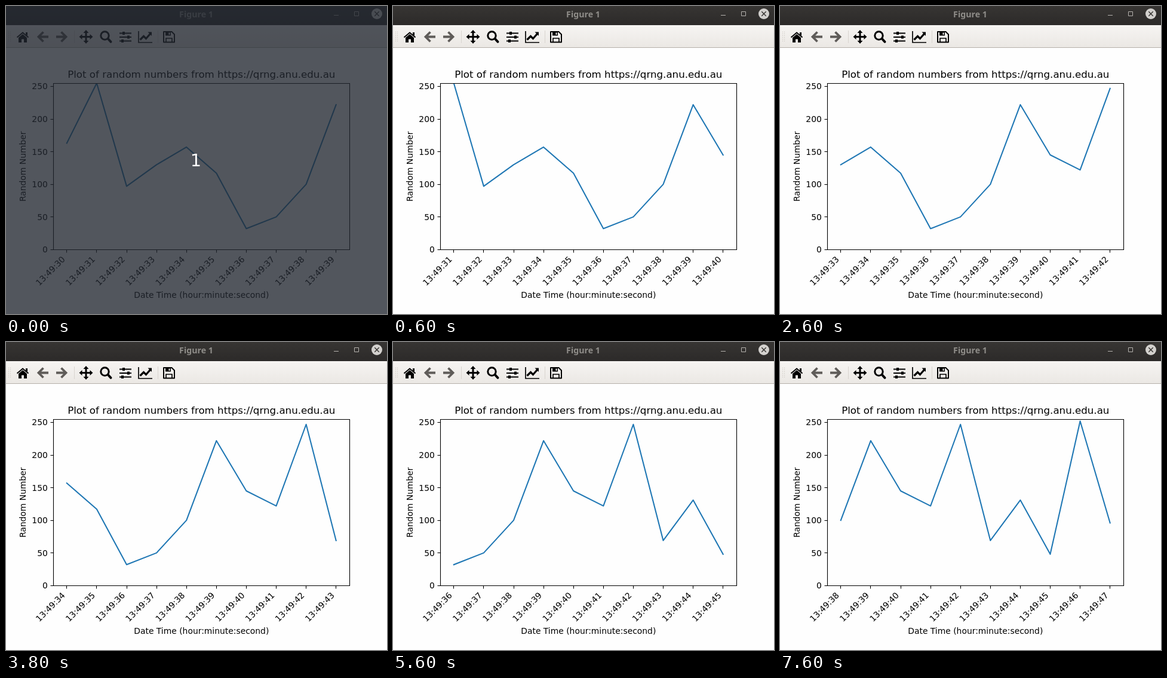
These frames come from a looping animation (638 px wide and 515 px high, 8000 ms). An HTML page:

```html
<!DOCTYPE html>
<html lang="en">
<head>
<meta charset="utf-8">
<title>Figure 1</title>
<style>
  html, body { margin: 0; width: 100%; height: 100%; overflow: hidden; background: #fefefe; }
  svg { display: block; }
  text { font-family: "DejaVu Sans", sans-serif; font-size: 13.89px; }
  .title { font-size: 16.67px; }
  .caption { font: bold 14.2px "Noto Sans", sans-serif; fill: #8f8d89; }
  .count { font-size: 28.8px; fill: #fff; }
  .mid { text-anchor: middle; }
  .end { text-anchor: end; }
  .line { fill: none; stroke: #1f77b4; stroke-width: 2.08; stroke-linejoin: round; stroke-linecap: square; }
  .axes { fill: none; stroke: #000; stroke-width: 1.1; }
  .icon { fill: none; stroke: #000; stroke-width: 2; }
  .arrow { fill: none; stroke: #5f5c59; stroke-width: 3.8; }
</style>
</head>
<body>
<svg width="638" height="515" viewBox="0 0 638 515">
  <defs>
    <linearGradient id="bar" x2="0" y2="1">
      <stop stop-color="#373533"/><stop offset="1" stop-color="#2c2a29"/>
    </linearGradient>
    <linearGradient id="tools" x2="0" y2="1">
      <stop stop-color="#f6f4f2"/><stop offset="1" stop-color="#ebe8e4"/>
    </linearGradient>
    <clipPath id="plot"><path d="M79.5 129H575.5V407.5H79.5z"/></clipPath>
  </defs>
  <rect width="638" height="515" fill="#fefefe"/>

  <!-- Window bar -->
  <rect width="638" height="32" fill="url(#bar)"/>
  <text class="caption mid" x="318.5" y="19">Figure 1</text>
  <path d="M549 15.5h8M583.5 9.5h7v7h-7z" fill="none" stroke="#b5b2ae"/>
  <circle cx="621" cy="13" r="9" fill="#d3d1ce"/>
  <path d="M617.3 9.3l7.4 7.4m0-7.4l-7.4 7.4" stroke="#33312f" stroke-width="1.4"/>

  <!-- Toolbar -->
  <rect y="32" width="638" height="37" fill="url(#tools)"/>
  <path d="M0 69.5H638" stroke="#b5b0aa"/>
  <path d="M4.5 43v17M7.5 43v17" stroke="#c4bfb9" stroke-dasharray="1 2"/>
  <path d="M114.5 41v21M254.5 41v21" stroke="#d8d4cf"/>
  <path d="M18.5 52.5L28 44.5l9.5 8" class="icon"/>
  <path d="M33 44h3v6l-3-2.500zM21 53l7-6 7 6v8h-5v-5.500h-4V61h-5z"/>
  <path class="arrow" d="M62.500 43.500l-8 8 8 8M54 51.500h17"/>
  <path class="arrow" d="M92.500 43.500l8 8-8 8M101 51.500H84"/>
  <path class="icon" style="stroke-width:3" d="M134 43v17M126 51.500h16"/>
  <path d="M134 40l4.500 5h-9zM134 63l4.500-5h-9zM122.500 51.500l5-4.500v9zM145.500 51.500l-5-4.500v9z"/>
  <circle class="icon" cx="165.500" cy="49.500" r="6.700" style="stroke-width:3"/>
  <path class="icon" style="stroke-width:4;stroke-linecap:round" d="M171.500 55.500l4 4.300"/>
  <path class="icon" d="M190 45.500h20M190 52h20M190 58.500h20"/>
  <path d="M195 43h4v5h-4zM203 49.500h4v5h-4zM193 56h4v5h-4z"/>
  <path class="icon" d="M222 42v19h23" style="stroke-width:1.700"/>
  <path class="icon" d="M224.500 56.500l6-6 4 4 7-8" style="stroke-width:3.200"/>
  <path d="M237.500 43.500h6.500v6.500z"/>
  <path class="icon" d="M264 43h13.500l4.500 4.500V60.500H264z" stroke-linejoin="round"/>
  <path class="icon" d="M268 60v-6h10v6" style="stroke-width:1.700"/>
  <path d="M267 43h9v6.500h-9z"/>
  <path d="M272.500 44.500h2v3.500h-2z" fill="#f1efec"/>

  <!-- Chart -->
  <text class="title mid" x="327.300" y="120">Plot of random numbers from https://qrng.anu.edu.au</text>
  <text class="mid" x="327.300" y="488">Date Time (hour:minute:second)</text>
  <text class="mid" transform="translate(33.300 268.300) rotate(-90)">Random Number</text>
  <polyline id="line" class="line" clip-path="url(#plot)"/>
  <path class="axes" d="M79.500 129.500H575.500V407.500H79.500z"/>
  <g id="ticks"></g>

  <g id="shade">
    <rect width="638" height="515" fill="#222730" fill-opacity=".78"/>
    <text class="count mid" x="318" y="268">1</text>
  </g>
</svg>
<script>
  const LOOP = 8000, SHOWN = 10;
  const values = [163, 255, 97, 130, 157, 117, 32, 50, 100, 222, 145, 122, 247, 69, 131, 48, 252, 96];
  const updates = [600, 1600, 2600, 3800, 4600, 5600, 6600, 7600];
  const xAt = i => 101.8 + 50.1 * i;
  const yAt = v => 407.2 - 1.0909 * v;
  const snap = n => Math.floor(n) + .5;
  const $ = id => document.getElementById(id);

  let ticks = "";
  for (let v = 0; v <= 250; v += 50) {
    const y = yAt(v);
    ticks += `<path class="axes" d="M79.5 ${snap(y)}h-5"/><text class="end" x="69.8" y="${y + 5}">${v}</text>`;
  }
  for (let i = 0; i < SHOWN; i++) {
    const x = xAt(i);
    ticks += `<path class="axes" d="M${snap(x)} 407.5v5"/>
      <text class="end time" transform="translate(${x - 2} 424.5) rotate(-45)"></text>`;
  }
  $("ticks").innerHTML = ticks;
  const labels = document.querySelectorAll(".time");

  let current = -1;
  function show(start) {
    if (start === current) return;
    current = start;
    $("line").setAttribute("points",
      values.slice(start, start + SHOWN).map((v, i) => `${xAt(i)},${yAt(v)}`).join(" "));
    labels.forEach((label, i) => label.textContent = `13:49:${30 + start + i}`);
  }

  function frame() {
    const t = performance.now() % LOOP;
    show(updates.filter(u => t >= u).length);
    $("shade").style.display = t < 100 ? "" : "none";
    requestAnimationFrame(frame);
  }
  frame();
</script>
</body>
</html>
```
